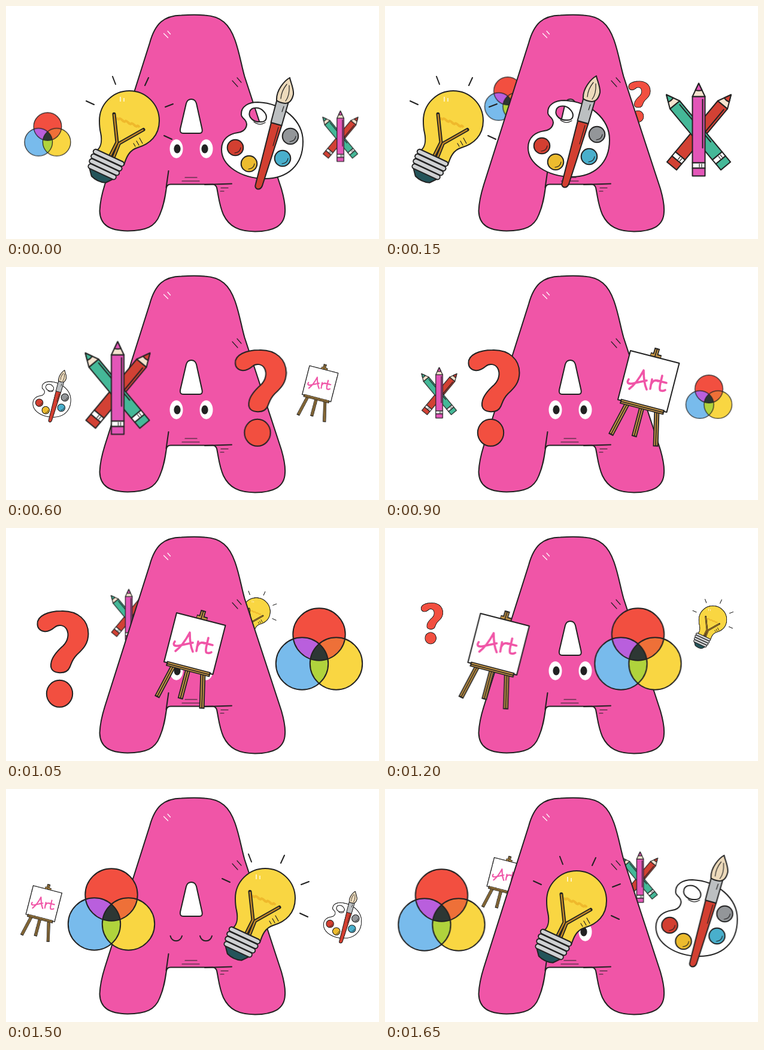
Write an HTML page that moves like this. It is 623 px wide and 390 px high and loops after 1800 ms.

```html
<!DOCTYPE html>
<html lang="en">
<head>
<meta charset="utf-8">
<title>A is for Art</title>
<style>
html, body { margin: 0; height: 100%; overflow: hidden; background: #fff; }
svg { display: block; width: 100vw; height: 100vh; }
.ink { stroke: #222; stroke-width: var(--ink, 2); stroke-linejoin: round; stroke-linecap: round; }
.thin { stroke-width: var(--thin, 1.2); }
.line { fill: none; }

/* Stops: w = wide, s = small, b = behind; r, c, l = right, centre, left */
.palette  { --d: -150ms;  --k: .465; --wr: 520.5px,204px; --r: 428px,213px; --c: 307px,210px; --l: 187px,213px; --wl: 96px,207px;
            --sl: 76.5px,216px; --bl: 205px,150px; --br: 430px,146px; --sr: 562px,214.5px; }
.bulb     { --d: -450ms;  --k: .465; --wr: 536px,183px; --r: 433px,183px; --c: 320px,187px; --l: 206px,192px; --wl: 114px,192px;
            --sl: 73px,208.5px; --bl: 208px,150px; --br: 418px,140px; --sr: 547.5px,153.5px; }
.venn     { --d: -750ms;  --k: .533; --wr: 523px,202px; --r: 422.5px,202px; --c: 299px,202px; --l: 176px,201px; --wl: 94.5px,202px;
            --sl: 69.5px,214.5px; --bl: 205px,155px; --br: 425px,150px; --sr: 541px,217px; }
.easel    { --d: -1050ms; --k: .587; --wr: 524px,218px; --r: 433px,218px; --c: 308px,220px; --l: 182.5px,221px; --wl: 98px,221px;
            --sl: 59px,207.5px; --bl: 196px,160.5px; --br: 428px,160px; --sr: 520.5px,211px; }
.question { --d: -1350ms; --k: .426; --wr: 517px,219px; --r: 425.5px,219px; --c: 304px,219px; --l: 182px,219px; --wl: 95px,219px;
            --sl: 78.5px,159.5px; --bl: 206px,135px; --br: 425px,160px; --sr: 553px,225.5px; }
.pencils  { --d: -1650ms; --k: .545; --wr: 524px,207px; --r: 408px,208.5px; --c: 297px,206px; --l: 186.5px,202.5px; --wl: 91.5px,204px;
            --sl: 90.5px,210.5px; --bl: 205px,145px; --br: 426px,147.5px; --sr: 558.5px,218px; }

.back { --ink: 2.3; --thin: 1.6; }
.back use  { animation: back 1800ms step-end var(--d) infinite; }
.front use { animation: front 1800ms step-end var(--d) infinite; }
@keyframes front {
  0%      { opacity: 1; transform: translate(var(--wr)); }
  8.333%  { opacity: 1; transform: translate(var(--r)); }
  16.666% { opacity: 1; transform: translate(var(--c)); }
  25%     { opacity: 1; transform: translate(var(--l)); }
  33.333% { opacity: 1; transform: translate(var(--wl)); }
  41.666%, 100% { opacity: 0; transform: translate(var(--wl)); }
}
@keyframes back {
  0%      { opacity: 0; transform: translate(var(--sl)) scale(var(--k)); }
  41.666% { opacity: 1; transform: translate(var(--sl)) scale(var(--k)); }
  50%     { opacity: 1; transform: translate(var(--bl)) scale(var(--k)); }
  58.333% { opacity: 0; transform: translate(var(--bl)) scale(var(--k)); }
  83.333% { opacity: 1; transform: translate(var(--br)) scale(var(--k)); }
  91.666% { opacity: 1; transform: translate(var(--sr)) scale(var(--k)); }
  100%    { opacity: 0; transform: translate(var(--sr)) scale(var(--k)); }
}
.open   { animation: open 1800ms step-end infinite; }
.closed { animation: closed 1800ms step-end infinite; }
@keyframes open   { 0%, 91.666%, 100% { opacity: 1; } 83.333% { opacity: 0; } }
@keyframes closed { 0%, 91.666%, 100% { opacity: 0; } 83.333% { opacity: 1; } }
</style>
</head>
<body>
<svg viewBox="0 0 623 390" role="img" aria-label="A is for Art">
<defs>
  <circle id="red" cx="422.5" cy="178" r="43.7"/>
  <circle id="blue" cx="394" cy="227" r="43.7"/>
  <circle id="yellow" cx="451" cy="227" r="43.7"/>
  <clipPath id="inRed"><use href="#red"/></clipPath>
  <clipPath id="inBlue"><use href="#blue"/></clipPath>

  <g id="venn"><g transform="translate(-422.5 -202)">
    <use href="#red" fill="#f24f40"/>
    <use href="#blue" fill="#78bbec"/>
    <use href="#yellow" fill="#f9d642"/>
    <use href="#blue" fill="#b95fdd" clip-path="url(#inRed)"/>
    <use href="#yellow" fill="#ee7038" clip-path="url(#inRed)"/>
    <g clip-path="url(#inBlue)">
      <use href="#yellow" fill="#b0d33c"/>
      <use href="#yellow" fill="#2d3734" clip-path="url(#inRed)"/>
    </g>
    <g class="ink line"><use href="#red"/><use href="#blue"/><use href="#yellow"/></g>
  </g></g>

  <rect id="thread" class="ink" x="-28" y="-4" width="56" height="8" rx="4" fill="#cfd1d3"/>
  <path id="wire" d="M407.5 172L412.5 219L400 244M456.5 198L416 221L406 246"/>
  <g id="bulb"><g transform="translate(-433 -183)">
    <path class="ink line" d="M405 109l5 13M465 111l-6 13M361 150l13 6M493 160l13-5M491 208l13 6"/>
    <path class="ink" fill="#f9d642" d="M375 235C386 230 388 217 385 203C383 195 383 189 383 183A50 50 0 0 1 483 183C483 208 467 222 447 228C433 232 428 244 424 257Z"/>
    <path fill="none" stroke="#efb92c" stroke-width="4" d="M411 178q4 4 5 2t5 2 5 2 5 2 5 2 5 2 5 2 4 2"/>
    <use href="#wire" fill="none" stroke="#222" stroke-width="6" stroke-linecap="round" stroke-linejoin="round"/>
    <use href="#wire" fill="none" stroke="#c58a25" stroke-width="2.4"/>
    <path class="line" stroke="#fff" stroke-width="1.3" d="M418 143v8M424 145v6"/>
    <path class="ink thin line" d="M440 221l3 5M445 217l4 7M450 212l5 9"/>
    <g transform="translate(398.5 245) rotate(25)">
      <path class="ink" fill="#24545a" d="M-22 29L-13 40Q0 45 13 40L22 29Z"/>
      <use href="#thread"/>
      <use href="#thread" y="8.6"/>
      <use href="#thread" y="17.2" transform="scale(.97 1)"/>
      <use href="#thread" y="25.8" transform="scale(.9 1)"/>
    </g>
  </g></g>

  <g id="paint">
    <circle class="ink" r="13.3" fill="currentColor"/>
    <path class="ink thin line" d="M9 0Q8 8-1 9"/>
  </g>
  <g id="palette"><g transform="translate(-428 -213)">
    <path class="ink" fill="#fff" fill-rule="evenodd" d="M393 182C392 168 405 161 421 161C463 163 496 192 496 227C496 267 470 289 432 289C391 288 360 267 360 240C360 222 373 214 387 212C402 210 404 198 400 192C397 187 393 187 393 182ZM407 177C410 168 424 169 430 176C438 184 436 194 426 194C414 195 404 187 407 177Z"/>
    <path class="ink thin line" d="M414 194Q424 201 433 195"/>
    <use href="#paint" x="383" y="237" color="#d33f31"/>
    <use href="#paint" x="406" y="264" color="#ecbb2e"/>
    <use href="#paint" x="462" y="255" color="#49afcc"/>
    <use href="#paint" x="475" y="218" color="#939699"/>
    <path class="ink" fill="#d33f31" d="M443 195L460.5 200L428 301Q425 308 419 306Q415 304 417 298Z"/>
    <path class="ink" fill="#bcbfc1" d="M452.5 157L471.5 162L460.5 200L442.5 195Z"/>
    <path class="ink" fill="#eddabb" d="M452 158C451 141 465 125 474 120C475 127 481 138 480 148C478 157 474 163 466 163Q457 162 452 158Z"/>
    <path class="ink thin line" d="M455 203L446 234M464 168l-3 9M459 155Q460 142 469 131M467 159Q474 150 473 133"/>
  </g></g>

  <g id="pencil" class="ink" fill="currentColor">
    <path d="M-10.5 22H10.5V133H-10.5Z"/>
    <path fill="#f5e4cf" d="M-10.5 22L0 0L10.5 22Z"/>
    <path d="M-5.5 11.5L0 0L5.5 11.5Q0 13-5.5 11.5Z"/>
    <path fill="#fff" d="M-10.5 133H10.5V142H-10.5Z"/>
    <path d="M-10.5 142H10.5V155H-10.5Z"/>
    <path class="line" d="M6.5 27V108"/>
    <path class="line thin" d="M1 135v5M5 135v5"/>
  </g>
  <g id="pencils">
    <use href="#pencil" color="#d24134" transform="translate(54 -58.5) rotate(39.7)"/>
    <use href="#pencil" color="#45b898" transform="translate(-54 -58.5) rotate(-39.7)"/>
    <use href="#pencil" color="#e356b8" transform="translate(0 -77.5)"/>
  </g>

  <g id="question" class="ink" fill="#f24f40"><g transform="translate(-425.5 -219)">
    <path d="M383 161C382 147 401 139 423 139C451 138 468 155 468 177C468 193 460 202 449 212C441 220 440 226 437 233C434 240 427 243 418 242C407 241 404 234 406 225C408 214 417 205 426 197C434 189 436 178 432 170C428 162 418 161 412 166C405 172 400 174 394 173C387 172 383 167 383 161Z"/>
    <ellipse cx="420" cy="277.3" rx="21.7" ry="22.5"/>
  </g></g>

  <g id="easel"><g transform="translate(-433 -218)" fill="none">
    <path stroke="#222" stroke-width="9" d="M455 136L449 156M443 147L461 152M405 228L377 281M429 235L416 284M454 240L452 300.5"/>
    <path stroke="#c59545" stroke-width="5.5" d="M454.5 138L449 156M444 147L460 152M405 228L378 279M429 235L416.5 282M454 240L452 298.5"/>
    <path stroke="#222" stroke-width="1.6" d="M455 136L449 156M405 228L377 281M429 235L416 284M454 240L452 300"/>
    <path class="ink" fill="#fff" d="M410 140L491.5 161L470.5 243L389 222Z"/>
    <path stroke="#222" stroke-width="8.5" d="M393 224.5L466 243.5"/>
    <path stroke="#c59545" stroke-width="5" d="M395 225L464 243"/>
    <path stroke="#222" stroke-width="1.5" d="M394 225L465 243.5"/>
    <path stroke="#f055a7" stroke-width="3.6" stroke-linecap="round" stroke-linejoin="round" d="M432 173C424 188 416 198 408 204M432 173C432 184 433 196 437 205M407 188C402 195 408 197 418 194L437 190M446 188L443 204M444 197Q449 187 456 191M463 182C461 191 456 207 461 207Q465 208 468 206M455 190L470 194"/>
  </g></g>
</defs>

<g class="back">
  <use href="#palette" class="palette"/>
  <use href="#bulb" class="bulb"/>
  <use href="#venn" class="venn"/>
  <use href="#easel" class="easel"/>
  <use href="#question" class="question"/>
  <use href="#pencils" class="pencils"/>
</g>

<g class="ink">
  <path fill="#f055a7" d="M240 62C249 29 264 16 293 15.5C306 14.5 318 14 332 15.5C359 17 373 30 382.5 57C390 78 393 99 398.5 118L460 306C464 320 467 332 466 345C465 369 446 377 416 377.5C389 377 373 370 363 349C356 333 355 318 352 304Q350 298.5 345 298.5H275Q269 298.5 268 304C266 318 264 333 257 349C249 370 234 376 203 376.5C172 376 157 366 156.5 343C157 329 160 315 165 299Z"/>
  <path fill="#fff" d="M301 163Q303 156 309.5 156Q316 156 318 163L327.5 206Q329 213 323 213H296Q290 213 291 206Z"/>
  <path class="line" d="M271.5 276L267.5 304M332 299L377 297.5"/>
  <path class="line thin" d="M299 287h20M294 293h29M359 304.5h12M358 310h6M378 125l9 10M386 120l7 8"/>
  <path class="line thin" style="stroke:#fff" d="M263.5 46l7 7M270 42l4.5 5"/>
</g>
<g class="open">
  <g fill="#fff"><ellipse cx="284.5" cy="239" rx="11" ry="15.7"/><ellipse cx="334.5" cy="239" rx="11" ry="15.7"/></g>
  <g fill="#222"><ellipse cx="286" cy="239" rx="5.6" ry="7.6"/><ellipse cx="332" cy="239" rx="5.6" ry="7.6"/></g>
</g>
<path class="closed ink line" d="M274.5 246C277 257 291 257 294 246M324 246C327 257 341 257 344 246"/>

<g class="front">
  <use href="#venn" class="venn"/>
  <use href="#bulb" class="bulb"/>
  <use href="#palette" class="palette"/>
  <use href="#pencils" class="pencils"/>
  <use href="#question" class="question"/>
  <use href="#easel" class="easel"/>
</g>
</svg>
</body>
</html>
```
